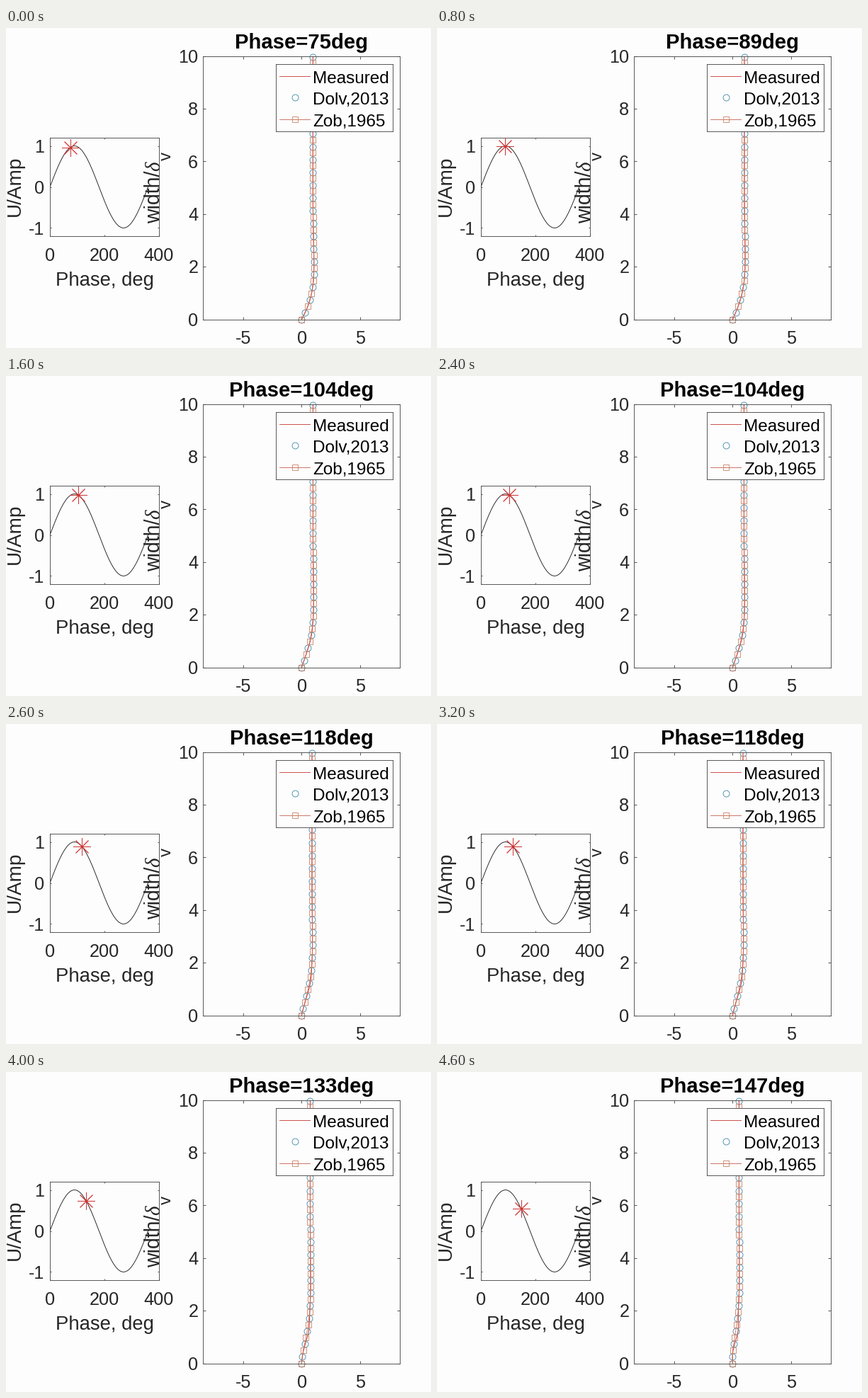
A matplotlib script for the animation above (5 s loop, 600 px wide and 452 px high).

```python
import numpy as np
import matplotlib.pyplot as plt
from matplotlib.animation import FuncAnimation

W, H, DPI = 600, 452, 64
PX = 72 / DPI  # points per pixel
PAPER, INK, FRAME = "#fdfdfd", "#262626", "#484848"
RED, STAR, CORAL, TAN, TEAL = "#c8403a", "#cc3333", "#cb6a58", "#cb8a70", "#4a8dab"
FRAMES, STEPS = 50, 6

fig = plt.figure(figsize=(W / DPI, H / DPI), dpi=DPI, facecolor=PAPER)


def panel(left, top, right, bottom, xlim, ylim, xticks=(), yticks=(), tick=0):
    ax = fig.add_axes([left / W, 1 - bottom / H, (right - left) / W, (bottom - top) / H],
                      facecolor=PAPER)
    ax.set(xlim=xlim, ylim=ylim, xticks=xticks, yticks=yticks)
    ax.tick_params(direction="in", top=True, right=True, length=tick * PX,
                   width=0.9 * PX, color=FRAME, labelbottom=False, labelleft=False)
    for spine in ax.spines.values():
        spine.set(linewidth=0.9 * PX, color=FRAME)
    return ax


def label(x, y, text, size, ha="center", font="Liberation Sans", color=INK, **kw):
    return fig.text(x / W, 1 - y / H, text, fontsize=size * PX, ha=ha, va="baseline",
                    family=font, color=color, rotation_mode="anchor", **kw)


def hollow(marker, size, color):
    return dict(marker=marker, ms=size * PX, mec=color, mfc="none", mew=0.9 * PX)


def stokes(phase, eta):
    """Oscillating flow over a fixed wall."""
    return np.sin(phase) - np.exp(-eta) * np.sin(phase - eta)


def measured(phase, eta, step):
    bump = 0.2 * (step / 5) ** 2 * np.exp(-((eta - 1.2) / 0.5) ** 2)
    return stokes(phase, eta) + bump


# Phase panel
wave = panel(62, 155, 216, 294, (0, 400), (-1.2, 1.2), (0, 200, 400), (-1, 0, 1), 1.6)
deg = np.linspace(0, 360, 181)
wave.plot(deg, np.sin(np.radians(deg)), color="#1c1c1c", lw=0.9 * PX)
star, = wave.plot([], [], marker=(8, 2, 0), ms=25 * PX, mec=STAR,
                  mew=0.9 * PX, clip_on=False, zorder=5)

for v in (0, 200, 400):
    label(62 + v * 0.385, 328.6, str(v), 25.3)
for v in (-1, 0, 1):
    label(54.5, 234 - v * 57.8, str(v), 25.3, "right")
label(139, 363.6, "Phase, deg", 27.5)
label(20, 223.5, "U/Amp", 28, rotation=90)

# Profile panel
prof = panel(278.4, 39.6, 556.4, 411.6, (-8.42, 8.42), (0, 10),
             (-5, 0, 5), range(0, 11, 2), 3.7)
eta = np.linspace(0, 10, 300)
eta_dots = np.append(0, 0.25 + 0.4855 * np.arange(21))
eta_squares = 0.487 * np.arange(21)
line, = prof.plot([], [], color=RED, lw=1.1 * PX)
dots, = prof.plot([], [], ls="", clip_on=False, **hollow("o", 9, TEAL))
squares, = prof.plot([], [], color=CORAL, lw=0.8 * PX, clip_on=False,
                     **hollow("s", 7.5, TAN))

for v in (-5, 0, 5):
    label(418 + v * 16.5, 446, str(v), 25.3)
for v in range(0, 11, 2):
    label(271.3, 420.8 - v * 37.2, str(v), 25.3, "right")
label(217, 276.5, "width/", 28.5, "left", rotation=90)
label(217, 201.5, "δ", 29, "left", "Liberation Serif", style="italic", rotation=90)
label(232.8, 187, "v", 24, "left", rotation=90)
title = label(417.4, 29, "", 29.3, color="black", weight="bold")

# Legend
key = panel(380.6, 51, 545.6, 146, (380.6, 545.6), (146, 51))
key.plot([386, 429], [68.5, 68.5], color=RED, lw=0.9 * PX)
key.plot(407.5, 98.5, ls="", **hollow("o", 9, TEAL))
key.plot([386, 429], [129.5, 129.5], color=CORAL, lw=0.9 * PX)
key.plot(407.5, 129.5, ls="", **hollow("s", 7.5, TAN))
for y, name in ((78, "Measured"), (107.7, "Dolv,2013"), (138.6, "Zob,1965")):
    label(433, y, name, 24.2, "left", color="black")


def draw(i):
    step = (STEPS * i + 5) // FRAMES
    angle = int(75 + 14.5 * step)
    phase = np.radians(angle)
    title.set_text(f"Phase={angle}deg")
    star.set_data([angle], [np.sin(phase)])
    line.set_data(measured(phase, eta, step), eta)
    dots.set_data(stokes(phase, eta_dots), eta_dots)
    squares.set_data(stokes(phase, eta_squares), eta_squares)
    return title, star, line, dots, squares


anim = FuncAnimation(fig, draw, frames=FRAMES, interval=100, repeat=True,
                     repeat_delay=0, blit=False)
plt.show()
```
